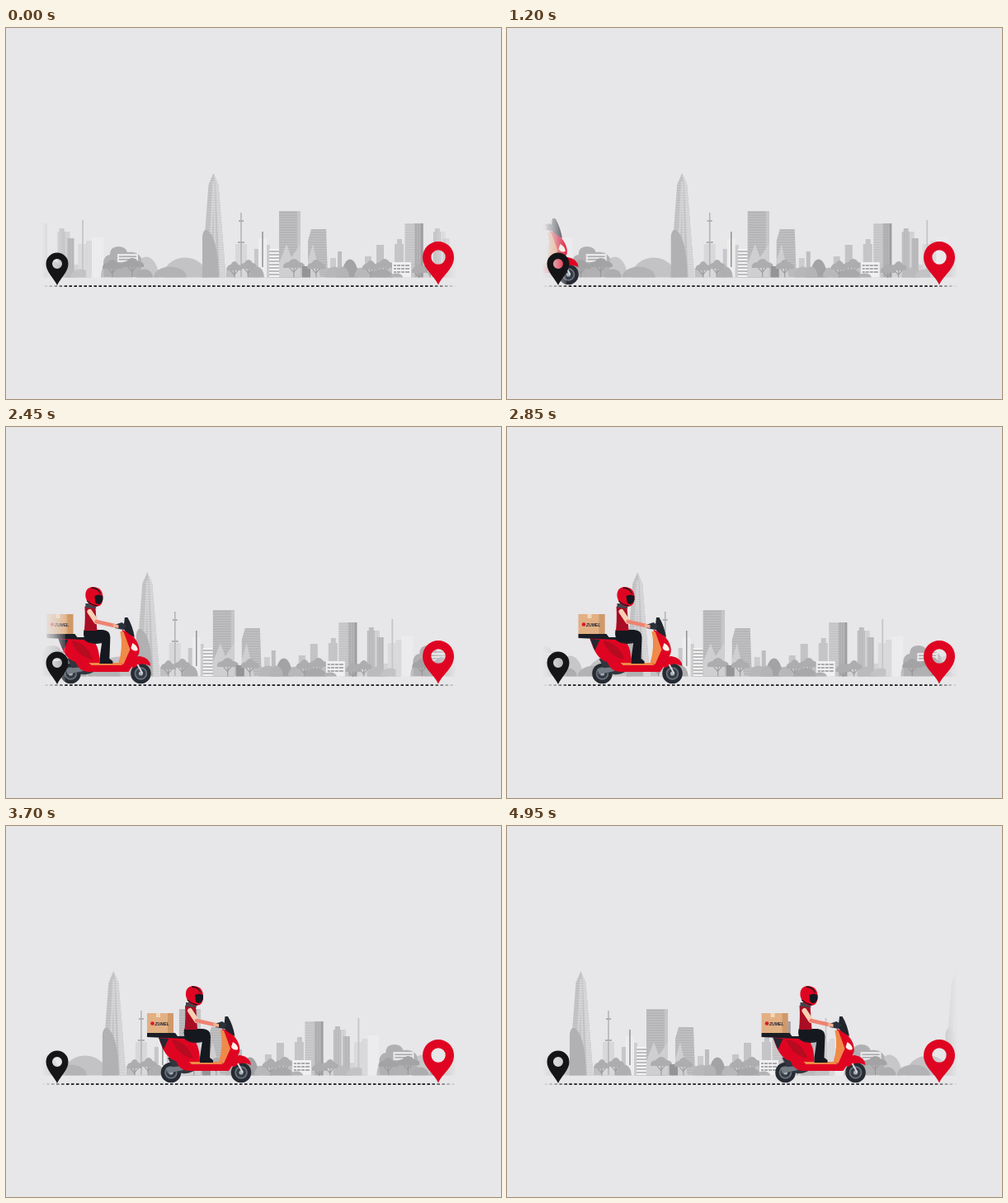
Recreate the animation shown at these times as an HTML page. Size 600x450 px, loop 5 s.

```html
<!DOCTYPE html>
<html lang="en">
<head>
<meta charset="utf-8">
<title>Delivery ride</title>
<style>
html, body { margin: 0; width: 100%; height: 100%; overflow: hidden; background: #e7e6e8; }
svg { display: block; width: 600px; height: 450px; }
</style>
</head>
<body>
<svg viewBox="0 0 600 450">
  <defs>
    <linearGradient id="fade" gradientUnits="userSpaceOnUse" x1="43" x2="546">
      <stop offset="0" stop-color="#fff" stop-opacity="0"/>
      <stop offset=".03" stop-color="#fff" stop-opacity=".35"/>
      <stop offset=".058" stop-color="#fff" stop-opacity=".85"/>
      <stop offset=".058" stop-color="#fff"/>
      <stop offset=".935" stop-color="#fff"/>
      <stop offset="1" stop-color="#fff" stop-opacity="0"/>
    </linearGradient>
    <mask id="edges" maskUnits="userSpaceOnUse" x="0" y="0" width="600" height="450">
      <rect width="600" height="450" fill="url(#fade)"/>
    </mask>
    <pattern id="floors" width="4" height="3" patternUnits="userSpaceOnUse">
      <path d="M0 .5H4" stroke="#fff" stroke-opacity=".16"/>
    </pattern>
    <pattern id="columns" width="3" height="4" patternUnits="userSpaceOnUse">
      <path d="M.5 0V4" stroke="#fff" stroke-opacity=".16"/>
    </pattern>
    <pattern id="slabs" width="4" height="4" patternUnits="userSpaceOnUse">
      <path d="M0 1H4" stroke="#f3f2f3" stroke-width="2"/>
    </pattern>
    <g id="city"></g>
    <g id="wheel">
      <circle r="12.3" fill="#262b33"/>
      <circle r="7.8" fill="#69727c"/>
      <circle r="6" fill="#343b45"/>
      <circle r="2.6" fill="#aab1b8"/>
    </g>
  </defs>

  <g mask="url(#edges)">
    <g id="skyline">
      <use href="#city" x="-455.5"/>
      <use href="#city"/>
      <use href="#city" x="455.5"/>
    </g>
    <g id="road" stroke="#17171a" stroke-width="1.9" stroke-dasharray="3.5 2.5">
      <path d="M-283.5 313.1H177M178 313.1H638.5M639.5 313.1H1100"/>
    </g>
    <g id="bike">
      <!-- scooter -->
      <use href="#wheel" x="116" y="299"/>
      <use href="#wheel" x="201" y="299"/>
      <path d="M112 281H140L146 296Q132 304 120 297Z" fill="#30363f"/>
      <path d="M110 293L131 291V296L112 300Z" fill="#747c85"/>
      <path d="M101 256H139Q151 262 151 286H183L191 261Q198 275 192 288L186 297H137Q126 296 122 285Q108 282 101 256Z" fill="#df0522"/>
      <path d="M101 257L113 258 107 271Z" fill="#252932"/>
      <path d="M117 259Q136 262 143 282Q124 279 117 259Z" fill="#b70b20"/>
      <path d="M138 286H176L179 289H141Z" fill="#ef8845"/>
      <path d="M178 246L187 249Q201 262 199 274Q195 285 186 292L178 287Q185 270 178 246Z" fill="#df0522"/>
      <path d="M176 248H180L188 270 180 288 174 286Q180 267 176 248Z" fill="#f08a48"/>
      <path d="M182 289Q187 278 200 278Q212 280 213 290Q202 284 193 292Z" fill="#df0522"/>
      <path d="M197 288L203 299" stroke="#d6dade" stroke-width="2"/>
      <path d="M191 262Q198 266 197 271Q192 273 189 268Z" fill="#fff2e8"/>
      <path d="M181.5 231H185Q191 241 193.5 255Q184 250 180 245Z" fill="#20242c"/>
      <path d="M169 240L178 237 184 241 180 246 170 244Z" fill="#2b3039"/>
      <path d="M87 251H121L124 255H154Q161 257 158 261Q141 266 132 258L87 256Z" fill="#1b1e25"/>
      <!-- parcel -->
      <path d="M87 227H119V251H87Z" fill="#e2b083"/>
      <path d="M112 227H119V251H112Z" fill="#cf996a"/>
      <path d="M98 227H103V232H98Z" fill="#f2d7b8"/>
      <circle cx="93.5" cy="239.5" r="2.3" fill="#d71a2b"/>
      <text x="96.5" y="241.8" font-family="'Liberation Sans', sans-serif" font-size="5" font-weight="700" font-style="italic" fill="#1f2433">ZUMEL</text>
      <!-- rider -->
      <path d="M132 246H155Q164 247 164 255L163 281 167 284V287H151V281L154 260H137Q130 257 132 246Z" fill="#15181f"/>
      <path d="M133 218Q139 214 146 218L148 247H132.5Q134 231 133 218Z" fill="#a90d24"/>
      <path d="M134 214H145L147 220 134 219Z" fill="#42454d"/>
      <path d="M139 224L147 236" stroke="#f8cfb4" stroke-width="6" stroke-linecap="round"/>
      <path d="M147 236L169 241" stroke="#ee8371" stroke-width="4.5" stroke-linecap="round"/>
      <path d="M167 239L174 240V244L168 243Z" fill="#f2b296"/>
      <path d="M134 206Q133 194 144 194Q155 195 155 207Q155 218 147 218Q136 217 134 206Z" fill="#df0522"/>
      <path d="M145 205Q150 202 155 205V210Q151 218 146 213Z" fill="#15181f"/>
      <path d="M141 195Q149 195 152 202M136 211Q141 216 148 217" fill="none" stroke="#25171c" stroke-width="1.3"/>
    </g>
  </g>
  <g id="pins" fill-rule="evenodd"></g>
</svg>

<script>
const $ = id => document.getElementById(id);
const GROUND = 302.5;
const rect = (x, y, w, fill, bottom = GROUND) =>
  `<rect x="${x}" y="${y}" width="${w}" height="${bottom - y}" fill="${fill}"/>`;
const block = (x, y, w, fill, texture = 'floors') =>
  rect(x, y, w, fill) + rect(x, y, w, `url(#${texture})`);
const shape = (d, fill) => `<path d="${d}" fill="${fill}"/>`;
const line = (d, stroke, width = 1) =>
  `<path d="${d}" fill="none" stroke="${stroke}" stroke-width="${width}"/>`;
const bush = (x, r, fill, h = r) =>
  shape(`M${x - r} ${GROUND}A${r} ${h} 0 0 1 ${x + r} ${GROUND}Z`, fill);
const tree = (x, y, r, fill = '#adacae') =>
  line(`M${x} ${GROUND}V${y}M${x} ${y + 9}l-5 -6M${x} ${y + 8}l5 -6`, '#98979a', 1.1) +
  shape(`M${x - r} ${y + 3}q-1 -6 ${r * .5} -7q${r * .5} -8 ${r} 0q${r * .6} 1 ${r * .5} 7z`, fill);

function drawCity() {
  const tower = 'M251.5 176L257.5 190 266.5 302.5H237L245.5 190Z';
  return [
    // slim towers at the far right of the strip
    rect(505, 287, 48, '#d3d2d4'),
    block(518, 247, 10, '#b9b8ba', 'columns'), rect(520, 243, 6, '#bdbcbe', 247),
    block(527, 247, 6, '#cfced0', 'columns'), block(530, 255, 8, '#b5b4b6', 'columns'),
    rect(543, 262, 10, '#dad9db'), line('M548.5 233V302', '#c6c5c7', 1.8),
    block(97, 258, 8, '#d7d6d8', 'columns'), block(104, 254, 14, '#ebeaec', 'columns'),
    // park and pavilion
    bush(125, 10, '#bebdbf', 18), bush(170, 15, '#c7c6c8', 25),
    shape('M118 286Q118 276 126 275Q126 265 136 265Q145 265 147 272Q159 270 164 279V302H119Z', '#b0afb1'),
    rect(135, 274, 25, '#e8e7e9', 284), rect(137, 276.5, 21, '#a9a8aa', 278), rect(137, 280, 21, '#a9a8aa', 281.5),
    tree(129, 289, 12, '#a3a2a4'), tree(153, 287, 14, '#a3a2a4'), bush(168, 10, '#adacae'), bush(142, 10, '#b1b0b2', 9),
    bush(217, 27, '#c3c2c4', 24), bush(199, 20, '#b3b2b4', 13),
    // tall tower
    shape(tower, '#bfbec0'), shape('M251.5 176L257.5 190 266.5 302.5H259L254 190Z', '#d2d1d3'),
    line('M251.5 186L246 302M252 190L254 302', '#cfced0', 2.5),
    shape(tower, 'url(#floors)'),
    shape('M238 302.5V252Q240 242 245 246Q257 255 258 302.5Z', '#b1b0b2'),
    // masts and low houses
    rect(267, 291, 210, '#c0bfc1'), rect(278, 262, 14, '#d8d7d9'),
    line('M285 224V302', '#b5b4b6', 1.6), line('M282 234H288M281 260H289', '#b0afb1', 2),
    rect(301, 268, 9, '#c7c6c8'), block(306, 255, 10, '#ececed', 'columns'),
    line('M311 247V290', '#919092', 1.5), rect(316, 263, 4, '#cdccce'),
    rect(319, 268, 12, '#bcbbbd'), rect(319, 268, 12, 'url(#slabs)'),
    tree(277, 291, 9), tree(294, 289, 10), bush(304, 9, '#afaeb0', 13),
    // office towers
    block(331, 222, 26, '#b5b4b6'), rect(353, 222, 4, '#c6c5c7'),
    shape('M331 302V285L340 262 346 278 357 262V302Z', '#cfced0'),
    shape('M370 244H388L390 302H366V258Z', '#b7b6b8'), shape('M370 244H388L390 302H366V258Z', 'url(#floors)'),
    shape('M366 282L372 262 381 302H366Z', '#cfced0'),
    tree(349, 288, 13), rect(359, 289, 10, '#949395'), tree(376, 289, 11),
    // rolling bushes and far houses
    rect(393, 279, 7, '#cccbcd'), rect(402, 271, 5, '#bdbcbe'), rect(435, 277, 8, '#c6c5c7'),
    rect(449, 263, 9, '#c3c2c4'), rect(471, 262, 11, '#c5c4c6'), rect(474, 256, 6, '#c5c4c6', 262),
    bush(398, 11, '#b7b6b8', 13), bush(417, 10, '#a3a2a4', 22), bush(408, 8, '#b4b3b5', 13),
    bush(432, 10, '#b8b7b9', 12), tree(442, 290, 10), tree(459, 288, 12), bush(455, 14, '#a8a7a9', 10),
    // windowed houses and the striped tower
    block(483.5, 237, 12, '#c4c3c5'), block(495, 237, 10.5, '#adacae', 'columns'),
    rect(503, 237, 2.5, '#9e9da0'),
    rect(468, 284, 23, '#f0eff1'), line('M470 288H489M470 292H489M470 296H489', '#aaa9ab', 2),
    line('M473.5 286V298M478.5 286V298M483.5 286V298', '#f0eff1', 1),
    bush(473, 8, '#b2b1b3', 5), tree(501, 294, 9), tree(514, 291, 10), bush(530, 12, '#bbbabc', 12),
    bush(546, 12, '#c3c2c4', 10)
  ].join('');
}

// Map pin: head centre, head radius, hole radius and tip height.
const pin = (x, y, r, hole, tip, fill) => shape(
  `M${x} ${tip}C${x - r * .3} ${tip - r * .65} ${x - r} ${y + r * .75} ${x - r} ${y}` +
  `A${r} ${r} 0 0 1 ${x + r} ${y}C${x + r} ${y + r * .75} ${x + r * .3} ${tip - r * .65} ${x} ${tip}Z` +
  `M${x - hole} ${y}a${hole} ${hole} 0 1 0 ${hole * 2} 0a${hole} ${hole} 0 1 0 ${-hole * 2} 0Z`, fill);

$('city').innerHTML = drawCity();
$('pins').innerHTML = pin(62, 286, 13.5, 6, 312, '#151518') + pin(524, 278, 19, 8.7, 311.5, '#df0522');

// Front wheel position over time in seconds: gentle start, then cruising.
const ride = [[0, 15], [1.2, 74.5], [2, 125.5], [2.85, 200.5], [3.7, 285], [4.45, 368], [4.95, 422.5]];
const slope = i => {
  const [t0, x0] = ride[Math.max(i - 1, 0)], [t1, x1] = ride[Math.min(i + 1, ride.length - 1)];
  return (x1 - x0) / (t1 - t0);
};
function bikeX(t) {
  let i = 0;
  while (i < ride.length - 2 && t > ride[i + 1][0]) i++;
  const [t0, x0] = ride[i], [t1, x1] = ride[i + 1], d = t1 - t0, u = (t - t0) / d, v = 1 - u;
  return x0 * v * v * (1 + 2 * u) + x1 * u * u * (3 - 2 * u) + d * u * v * (slope(i) * v - slope(i + 1) * u);
}

const move = (id, x) => $(id).setAttribute('transform', `translate(${x.toFixed(2)})`);
function draw() {
  const t = Math.floor(performance.now() % 5000 / 50) * .05;
  move('skyline', -32.73 * t);
  move('road', -36.5 * t);
  move('bike', bikeX(t) - 201);
  requestAnimationFrame(draw);
}
draw();
</script>
</body>
</html>
```
